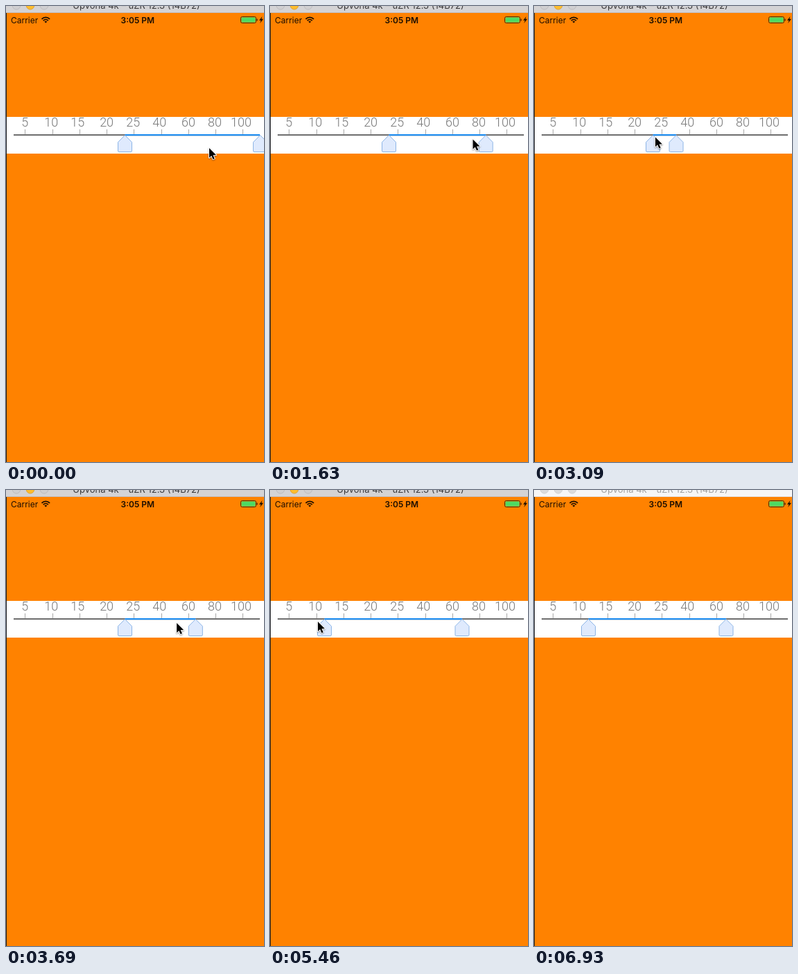
Animation, 372 px wide and 658 px high, one loop 7.03 s. Source, as an HTML page with a canvas:

```html
<!DOCTYPE html>
<html lang="en">
<head>
<meta charset="utf-8">
<title>Range slider</title>
<style>
  html, body { margin: 0; width: 100%; height: 100%; overflow: hidden; background: #ff8200; }
  canvas { display: block; }
</style>
</head>
<body>
<canvas id="stage" width="372" height="658"></canvas>
<script>
const ctx = document.getElementById('stage').getContext('2d');
const LOOP = 7030;
const TICKS = 48;
const TICK = LOOP / TICKS + 0.94;
const UI_FONT = 'Inter, Roboto, sans-serif';
const INK = '#1a0d00';

const progress = (tick, from, to) => Math.min(1, Math.max(0, (tick - from) / (to - from)));
const smooth = u => u * u * (3 - 2 * u);
const easeOut = u => u * (2 - u);

// Each move starts where the previous one ended.
function glide(start, moves, tick, ease) {
  return moves.reduce((value, { from, to, end }) =>
    value + (end - value) * ease(progress(tick, from, to)), start);
}

const pointerMoves = [
  { from: 0, to: 5, x: 364, y: 202 },      // reach the right handle
  { from: 7, to: 17, x: 161, y: 187 },     // drag it left
  { from: 18, to: 26, x: 250, y: 192 },    // drag it back
  { from: 26, to: 30, x: 173, y: 196 },    // reach the left handle
  { from: 32, to: 35.6, x: 69, y: 190 },   // drag it left
  { from: 38, to: 42, x: 380, y: 690 }     // leave the screen
];
const movesAlong = axis => pointerMoves.map(m => ({ from: m.from, to: m.to, end: m[axis] }));
const pointerX = tick => glide(293, movesAlong('x'), tick, smooth);
const pointerY = tick => glide(205, movesAlong('y'), tick, easeOut);
const lowValue = tick => glide(171.5, [{ from: 32, to: 36.2, end: 78.5 }], tick, smooth);
const highValue = tick => glide(366.5, [
  { from: 8, to: 16, end: 191.7 },
  { from: 18, to: 26, end: 277 }
], tick, smooth);

function rect(color, x, y, w, h) {
  ctx.fillStyle = color;
  ctx.fillRect(x, y, w, h);
}

function text(str, x, y, font, color, align = 'left') {
  ctx.font = font;
  ctx.fillStyle = color;
  ctx.textAlign = align;
  ctx.fillText(str, x, y);
}

// Fills and/or outlines the current path.
function paint(fill, stroke, width = 1) {
  if (fill) { ctx.fillStyle = fill; ctx.fill(); }
  if (stroke) { ctx.strokeStyle = stroke; ctx.lineWidth = width; ctx.stroke(); }
}

function polygon(points, fill, stroke, width) {
  ctx.beginPath();
  points.forEach(([x, y]) => ctx.lineTo(x, y));
  ctx.closePath();
  ctx.lineJoin = 'round';
  paint(fill, stroke, width);
}

function roundBox(x, y, w, h, r, fill, stroke) {
  ctx.beginPath();
  ctx.roundRect(x, y, w, h, r);
  paint(fill, stroke);
}

function drawTitleBar(active) {
  rect(active ? '#d4d3d5' : '#f6f6f6', 0, 0, 372, 10);
  rect(active ? '#c2bfc2' : '#e4e2e2', 0, 9, 372, 1);
  for (let i = 0; i < 3; i++) {
    const lit = active && i === 1;
    ctx.beginPath();
    ctx.arc(15 + 20 * i, -0.8, 5.8, 0, Math.PI * 2);
    paint(lit ? '#fdbd2e' : active ? '#d0cfd1' : '#dcdcdc',
      lit ? '#e2a432' : active ? '#bdbbbe' : '#d0d0d0');
  }
  text('Upvona 4k – uZR 12.3 (14B72)', 188, 4, '13px ' + UI_FONT,
    active ? '#3c3b3d' : '#a3a3a3', 'center');
}

function drawWifi(x, y) {
  const from = -Math.PI * 0.75, to = -Math.PI * 0.25;
  for (const r of [5, 8.2]) {
    ctx.beginPath();
    ctx.arc(x, y, r, from, to);
    paint(null, INK, 1.8);
  }
  ctx.beginPath();
  ctx.moveTo(x, y);
  ctx.arc(x, y, 2.8, from, to);
  paint(INK);
}

function drawStatusBar() {
  text('Carrier', 7, 24.5, '12px ' + UI_FONT, INK);
  text('3:05 PM', 189.8, 24.5, '600 12px ' + UI_FONT, INK, 'center');
  drawWifi(57.3, 24.6);
  roundBox(338.5, 15.5, 22, 9, 2, null, '#4a2a08');
  roundBox(339.5, 16.5, 20, 7, 1, '#4cd964');
  rect('#4a2a08', 361.5, 18.5, 1.3, 3);
  polygon([[369.5, 15], [365, 20.8], [367.6, 20.8], [366.2, 25], [371, 18.8], [368.3, 18.8]], INK);
}

function drawHandle(x) {
  ctx.beginPath();
  ctx.moveTo(x, 186.5);
  ctx.lineTo(x + 10, 196.5);
  ctx.arcTo(x + 10, 210.5, x, 210.5, 1.5);
  ctx.arcTo(x - 10, 210.5, x - 10, 196.5, 1.5);
  ctx.lineTo(x - 10, 196.5);
  ctx.closePath();
  paint('#dfeafd', '#8db5e6');
}

function drawSlider(low, high) {
  rect('#ffffff', 1, 160, 371, 53);
  [5, 10, 15, 20, 25, 40, 60, 80, 100].forEach((value, i) => {
    const x = 27.3 + i * 39.27;
    rect('#a8a8a8', Math.round(x), 178, 1, 7);
    // labels drift left of their ticks within each group of three
    text(value, x - (i % 3) * 1.25, 174,
      '300 18px Roboto, "Liberation Sans", sans-serif', '#777777', 'center');
  });
  rect('#747474', 11, 185, 355, 2.2);
  rect('#1f8df0', low, 185, Math.min(high, 366) - low, 2.2);
  drawHandle(low);
  drawHandle(high);
}

function drawPointer(x, y) {
  const arrow = [[0, 0], [0, 14], [3.2, 11], [5.5, 16.2], [7.8, 15.2], [5.5, 10.2], [10, 10]];
  ctx.save();
  ctx.translate(x, y);
  ctx.shadowColor = 'rgba(0,0,0,.35)';
  ctx.shadowBlur = 2;
  ctx.shadowOffsetY = 1;
  polygon(arrow, '#ffffff', '#ffffff', 2);
  ctx.shadowColor = 'transparent';
  polygon(arrow, '#000000');
  ctx.restore();
}

function drawTooltip(alpha) {
  ctx.save();
  ctx.globalAlpha = alpha;
  ctx.shadowColor = 'rgba(90,40,0,.45)';
  ctx.shadowBlur = 2;
  roundBox(302.5, 644, 90, 30, 4, '#f3cc97');
  ctx.shadowColor = 'transparent';
  roundBox(302.5, 644, 90, 30, 4, null, '#c08848');
  text('Dorn Felt', 316, 661.5, '14px ' + UI_FONT, '#33261a');
  ctx.restore();
}

function draw(time) {
  const tick = Math.min(TICKS - 1, Math.floor((time % LOOP + 4) / TICK));
  rect('#ff8200', 0, 0, 372, 658);
  rect('#16181c', 0, 10, 1, 648);
  drawTitleBar(tick < TICKS - 1);
  drawStatusBar();
  drawSlider(lowValue(tick), highValue(tick));
  if (tick < 42) drawPointer(pointerX(tick), pointerY(tick));
  else drawTooltip(1 - progress(tick, 43, 45));
}

const start = performance.now();
function loop() {
  draw(performance.now() - start);
  requestAnimationFrame(loop);
}
loop();
</script>
</body>
</html>
```
